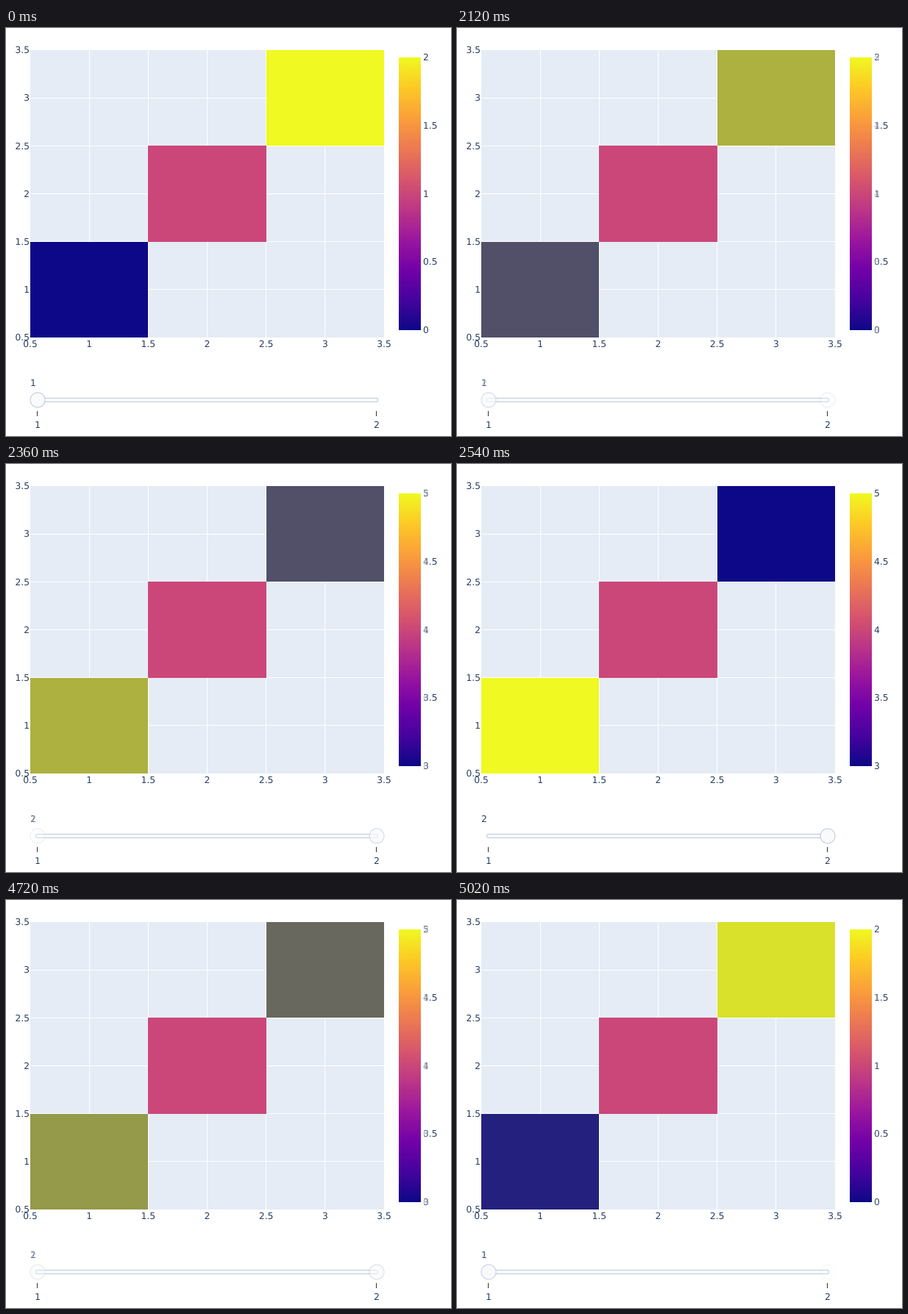
Write a matplotlib script that moves like this. It is 605 px wide and 555 px high and loops after 5.08 s.

```python
import numpy as np
import matplotlib.pyplot as plt
from matplotlib.animation import FuncAnimation
from matplotlib.colors import to_rgb
from matplotlib.patches import Circle, FancyBboxPatch, PathPatch, Rectangle
from matplotlib.textpath import TextPath
from matplotlib.transforms import Affine2D

W, H, DPI = 605, 555, 64
PX = 72 / DPI  # one pixel in points
STEP, LOOP = 20, 5080
HOLD, FADE_STEP, FADE = 2000, 60, 540

INK, PLOT_BG = "#2a3f5f", "#e5ecf6"
RAIL, RAIL_EDGE = "#f8fafc", "#bec8d9"
PLASMA = np.array([to_rgb(c) for c in (
    "#0d0887", "#46039f", "#7201a8", "#9c179e", "#bd3786",
    "#d8576b", "#ed7953", "#fb9f3a", "#fdca26", "#f0f921")])
SIZE = 12.3
DIGIT = 0.636 * SIZE

LEFT, TOP, RIGHT, BOTTOM = 33, 30, 514, 421
BAR_X, BAR_TOP, BAR_W, BAR_H = 534, 40, 30, 371
GRIP_X, GRIP_Y = (43, 504), 506


def plasma(v):
    stops = np.linspace(0, 1, len(PLASMA))
    return np.stack([np.interp(v, stops, PLASMA[:, i]) for i in range(3)], -1)


fig = plt.figure(figsize=(W / DPI, H / DPI), dpi=DPI, facecolor="white")
ax = fig.add_axes([0, 0, 1, 1])
ax.axis("off")


def rect(x0, y0, x1, y1, color, z=1):
    return ax.add_patch(Rectangle((x0, y0), x1 - x0, y1 - y0,
                                  fc=color, lw=0, zorder=z))


def label(s, x, cy, align=0.0):
    """Text centred on cy; align 0, 0.5 or 1 is left, centre or right."""
    width = DIGIT * (len(s) - 0.5 * s.count("."))
    place = Affine2D().scale(1, -1).translate(x - align * width,
                                              round(cy + 4.2))
    path = TextPath((0, 0), s, size=SIZE, prop={"family": "DejaVu Sans"})
    return ax.add_patch(PathPatch(place.transform_path(path),
                                  fc=INK, lw=0, zorder=5))


def grip(x):
    return ax.add_patch(Circle((x, GRIP_Y), 10, fc=RAIL, ec=RAIL_EDGE,
                               lw=PX, zorder=4))


# Plot area, grid and axis labels
rect(LEFT, TOP, RIGHT, BOTTOM, PLOT_BG)
for i in range(7):
    gx = LEFT + (RIGHT - LEFT) * i / 6
    gy = BOTTOM - (BOTTOM - TOP) * i / 6
    if 0 < i < 6:
        col, row = int(gx + 0.49) if gx % 1 < 0.5 else int(gx), int(gy)
        rect(col, TOP, col + 1, BOTTOM, "white", 2)
        rect(LEFT, row, RIGHT, row + 1, "white", 2)
    text = f"{0.5 + i / 2:g}"
    label(text, gx, 430, 0.5)
    label(text, 32, gy, 1)

# Diagonal heatmap cells
xs, ys = (33, 193, 354, 514), (421, 291, 160, 30)
cells = [rect(xs[i], ys[i + 1], xs[i + 1], ys[i], plasma(i / 2), 3)
         for i in range(3)]

# Colour bar
ramp = plasma(1 - (np.arange(BAR_H) + 0.5) / BAR_H)[:, None, :]
ax.imshow(ramp, extent=(BAR_X, BAR_X + BAR_W, BAR_TOP + BAR_H, BAR_TOP),
          aspect="auto", interpolation="nearest", zorder=2)
first, second = [], []
for i in range(5):
    cy = BAR_TOP + BAR_H * (1 - i / 4)
    first.append(label(str(i // 2), 567, cy))
    second.append(label(str(i // 2 + 3), 567, cy))
    if i % 2:
        label(".5", 567 + DIGIT, cy)

# Slider
ax.add_patch(FancyBboxPatch((40.5, 503.5), 465, 5,
                            boxstyle="round,pad=0,rounding_size=2",
                            fc=RAIL, ec=RAIL_EDGE, lw=PX, zorder=3))
for tick, x, group in zip("12", GRIP_X, (first, second)):
    rect(x - 1, 521, x, 528, "#333333")
    label(tick, x, 540, 0.5)
    group += [label(tick, 33, 483), grip(x)]

ax.set_xlim(0, W)
ax.set_ylim(H, 0)


def mix_at(t):
    """Share of the second state, in ten-percent steps during a fade."""
    half = HOLD + FADE
    back, t = divmod(t, half)
    mix = 0 if t < HOLD else ((t - HOLD) // FADE_STEP + 1) / 10
    return 1 - mix if back else mix


def update(n):
    mix = mix_at(n * STEP)
    for i, cell in enumerate(cells):
        cell.set_facecolor((1 - mix) * plasma(i / 2) + mix * plasma(1 - i / 2))
    for art in first:
        art.set_alpha(1 - mix)
    for art in second:
        art.set_alpha(mix)
    return cells + first + second


anim = FuncAnimation(fig, update, frames=LOOP // STEP, interval=STEP,
                     repeat=True, repeat_delay=0)
plt.show()
```
